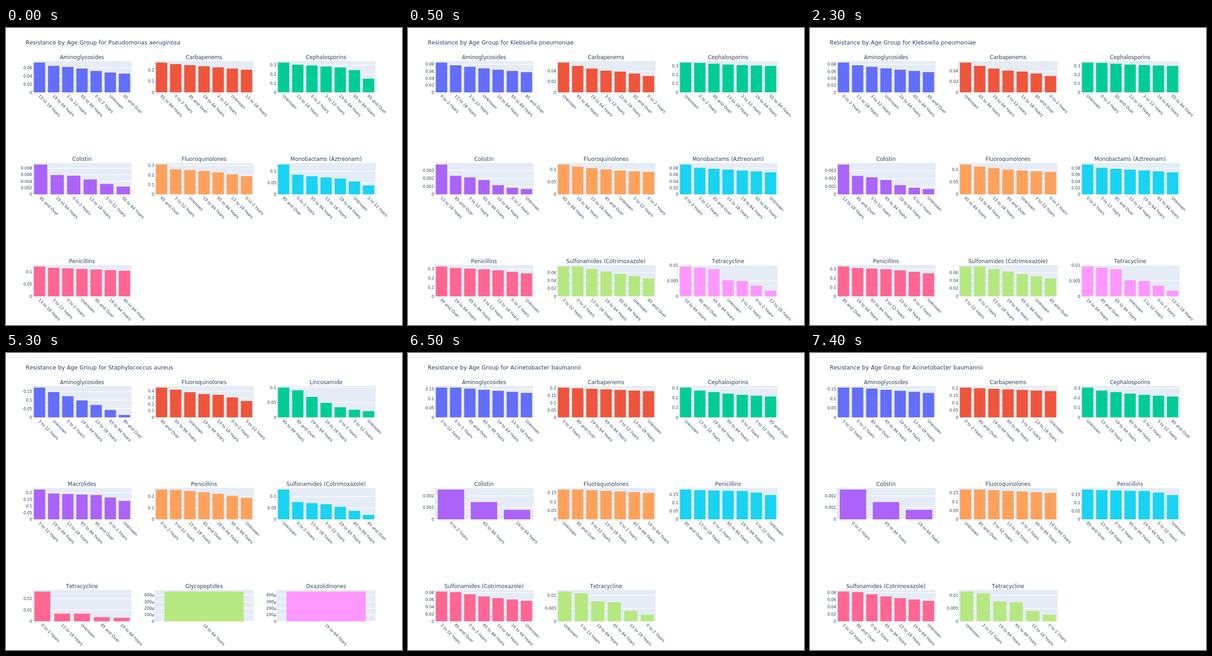
These frames come from a looping animation (864x648 px, 8000 ms). An HTML page:

```html
<!DOCTYPE html>
<html lang="en">
<head>
<meta charset="utf-8">
<title>Resistance by Age Group</title>
<style>
html, body { margin: 0; width: 100%; height: 100%; overflow: hidden; background: #fff; }
svg { display: block; width: 864px; height: 648px; }
text {
  font-family: "DejaVu Sans", Verdana, sans-serif;
  font-kerning: none;
  word-spacing: 0.034em;
  fill: #2a3f5f;
}
.head { font-size: 12.2px; }
.name { font-size: 11.45px; text-anchor: middle; }
.tick { font-size: 8.64px; text-anchor: end; }
.cat { font-size: 8.62px; }
</style>
</head>
<body>
<svg id="stage" viewBox="0 0 864 648"></svg>
<script>
const LOOP = 8000;
const WIDTH = 216.2, HEIGHT = 68.5;
const FULL = HEIGHT * 0.95;   // height of the tallest bar
const MIN_GAP = 14;           // least distance between ticks
const AGES = ["0 to 2 Years", "3 to 12 Years", "13 to 18 Years", "19 to 64 Years",
  "65 to 84 Years", "85 and Over", "Unknown"];
const COLORS = ["#636efa", "#ef553b", "#00cc96", "#ab63fa", "#ffa15a",
  "#19d3f3", "#ff6692", "#b6e880", "#ff97ff"];
const stage = document.getElementById("stage");
const scenes = [];

function add(parent, tag, attrs, text) {
  const node = document.createElementNS("http://www.w3.org/2000/svg", tag);
  for (const key in attrs) node.setAttribute(key, attrs[key]);
  if (text !== undefined) node.textContent = text;
  return parent.appendChild(node);
}

function rect(parent, x, y, width, height, fill) {
  add(parent, "rect", { x, y, width, height, fill });
}

// Smallest step of 1, 2 or 5 times a power of ten that leaves room for labels
function niceStep(peak) {
  for (let power = 1e-5; ; power *= 10) {
    for (const m of [1, 2, 5]) {
      if (m * power / peak * FULL >= MIN_GAP) return m * power;
    }
  }
}

function tickLabel(value, peak) {
  return value && peak < 0.001 ? Math.round(value * 1e6) + "µ" : String(+value.toFixed(4));
}

// The first bar is full; the others follow a line through evenly spread keys
function barHeight(i, count, keys) {
  if (i === 0) return FULL;
  const pos = (i - 1) / Math.max(1, count - 2) * (keys.length - 1);
  const k = Math.floor(pos + 1e-9);
  const next = keys[Math.min(k + 1, keys.length - 1)];
  return FULL * (keys[k] + (next - keys[k]) * (pos - k)) / 100;
}

// ages: one AGES digit per bar; peak: value of the first bar; keys: percent of it
function drawPanel(group, index, [name, ages, peak, ...keys]) {
  const x = 57.7 + 266.3 * (index % 3);
  const base = 140.5 + 222.5 * Math.floor(index / 3);
  const top = base - HEIGHT;
  add(group, "text", { class: "name", x: x + WIDTH / 2, y: top - 4.3 }, name);
  rect(group, x, top, WIDTH, HEIGHT, "#e5ecf6");

  const step = niceStep(peak);
  const gap = step / peak * FULL;
  for (let k = 0; k * gap < HEIGHT; k++) {
    const y = base - k * gap;
    const line = k ? 1.2 : 1.44;
    rect(group, x, y - line / 2, WIDTH, line, "#fff");
    add(group, "text", { class: "tick", x: x - 0.6, y: y + 3.1 }, tickLabel(k * step, peak));
  }

  const slot = WIDTH / ages.length;
  [...ages].forEach((age, i) => {
    const mid = x + slot * (i + 0.5);
    const h = barHeight(i, ages.length, keys);
    rect(group, mid - slot * 0.4, base - h, slot * 0.8, h, COLORS[index]);
    add(group, "text", {
      class: "cat",
      transform: `translate(${mid - 3},${base + 8.5}) rotate(45)`
    }, AGES[age]);
  });
}

function addScene(start, species, panels) {
  const group = add(stage, "g", { visibility: "hidden" });
  add(group, "text", { class: "head", x: 43, y: 35.8 }, "Resistance by Age Group for " + species);
  panels.forEach((panel, i) => drawPanel(group, i, panel));
  scenes.push({ start, group });
}

addScene(0, "Pseudomonas aeruginosa", [
  ["Aminoglycosides", "2314065", 0.073, 89, 83, 69, 63],
  ["Carbapenems", "4053162", 0.2686, 95, 86, 76],
  ["Cephalosporins", "6201345", 0.328, 93, 90, 85, 82, 46],
  ["Colistin", "530214", 0.00915, 65, 62, 38, 26],
  ["Fluoroquinolones", "5163420", 0.3095, 84, 77, 61],
  ["Monobactams (Aztreonam)", "5042361", 0.129, 66, 58, 52, 30],
  ["Penicillins", "2106534", 0.1217, 96, 86]
]);

addScene(500, "Klebsiella pneumoniae", [
  ["Aminoglycosides", "0216345", 0.085, 91, 78, 68],
  ["Carbapenems", "6431250", 0.0563, 89, 74, 69, 55],
  ["Cephalosporins", "6052134", 0.3385, 99, 92, 89],
  ["Colistin", "2514306", 0.00374, 62, 54, 25, 18],
  ["Fluoroquinolones", "4325610", 0.1204, 93, 81, 75],
  ["Monobactams (Aztreonam)", "0152346", 0.0915, 89, 74],
  ["Penicillins", "5341206", 0.33, 95, 90, 77],
  ["Sulfonamides (Cotrimoxazole)", "1023465", 0.0758, 100, 79, 60],
  ["Tetracycline", "3546102", 0.00964, 96, 91, 54, 52, 36, 19]
]);

addScene(3500, "Staphylococcus aureus", [
  ["Aminoglycosides", "1603245", 0.1729, 85, 50, 8],
  ["Fluoroquinolones", "5463201", 0.4545, 93, 79, 75, 55],
  ["Lincosamide", "4532016", 0.1, 91, 54, 29, 21],
  ["Macrolides", "1324506", 0.2241, 87, 84, 81, 62],
  ["Penicillins", "0125346", 0.26, 99, 89, 72],
  ["Sulfonamides (Cotrimoxazole)", "6021345", 0.1305, 58, 49, 15],
  ["Tetracycline", "02653", 0.0264, 26, 26, 14, 12],
  ["Glycopeptides", "3", 0.000455],
  ["Oxazolidinones", "3", 0.000455]
]);

addScene(6500, "Acinetobacter baumannii", [
  ["Aminoglycosides", "1054326", 0.1585, 100, 82],
  ["Carbapenems", "0534126", 0.2044, 98, 88],
  ["Cephalosporins", "6234015", 0.3066, 90, 77, 70],
  ["Colistin", "043", 0.00253, 58, 32],
  ["Fluoroquinolones", "6512043", 0.1693, 100, 89],
  ["Penicillins", "5204316", 0.1806, 98, 96, 95, 82],
  ["Sulfonamides (Cotrimoxazole)", "1504236", 0.0828, 98, 80, 69],
  ["Tetracycline", "613420", 0.01157, 94, 67, 64, 35, 22]
]);

function show(time) {
  const current = scenes.filter(s => s.start <= time).pop();
  for (const s of scenes) {
    s.group.setAttribute("visibility", s === current ? "visible" : "hidden");
  }
}

const begin = performance.now();
function frame() {
  show(Math.max(0, performance.now() - begin) % LOOP);
  requestAnimationFrame(frame);
}
frame();
</script>
</body>
</html>
```
